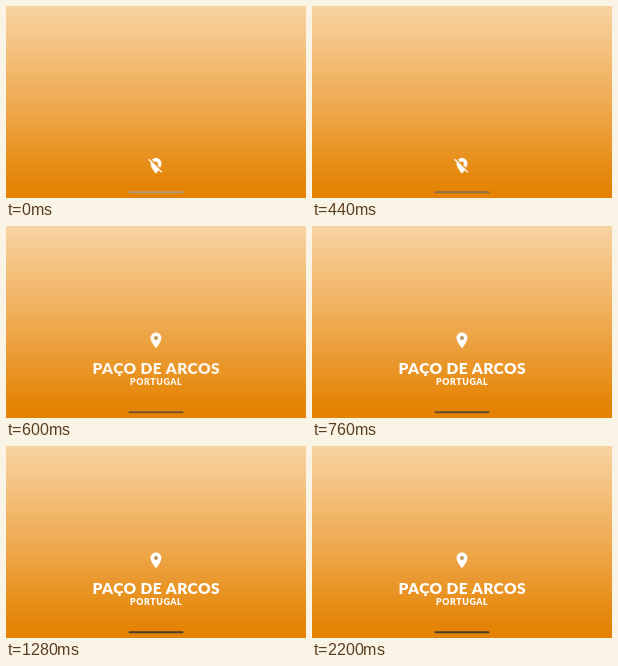
Write an HTML page that moves like this. It is 300 px wide and 192 px high and loops after 3040 ms.

```html
<!DOCTYPE html>
<html lang="pt">
<head>
<meta charset="utf-8">
<title>Paço de Arcos</title>
<style>
  html, body { margin: 0; width: 100%; height: 100%; overflow: hidden; }
  svg { display: block; width: 100%; height: 100%; }
  text { font-family: Lato, sans-serif; font-weight: 900; fill: #fff; text-anchor: middle; }
  .town { font-size: 15.5px; letter-spacing: .45px; }
  .country { font-size: 8.8px; letter-spacing: .6px; }
  .off, .place, .bar { animation: 3040ms linear infinite; }
  .off { animation-name: rise; }
  .place { animation-name: reveal; }
  .bar { animation-name: darken; }

  /* the crossed-out pin waits, then accelerates upwards until the cut at 600 ms */
  @keyframes rise {
    0% { transform: translateY(0); opacity: 1; }
    14.474% { transform: translateY(0); animation-timing-function: cubic-bezier(.333, 0, .667, 0); }
    19.7% { transform: translateY(-41px); opacity: 1; }
    19.701%, 100% { transform: translateY(-41px); opacity: 0; }
  }
  @keyframes reveal {
    0%, 19.7% { opacity: 0; }
    19.701% { opacity: .92; }
    25%, 100% { opacity: 1; }
  }
  @keyframes darken {
    0% { fill: #b39a7c; }
    14.474% { fill: #8f7048; }
    19.737% { fill: #765529; }
    30.263% { fill: #57422a; }
    42.105%, 100% { fill: #493f35; }
  }
</style>
</head>
<body>
<svg viewBox="0 0 300 192" preserveAspectRatio="none">
  <defs>
    <linearGradient id="sky" x2="0" y2="1">
      <stop stop-color="#f8d3a2"/>
      <stop offset=".5" stop-color="#efab52"/>
      <stop offset=".92" stop-color="#e58507"/>
      <stop offset="1" stop-color="#e48200"/>
    </linearGradient>
  </defs>
  <rect width="300" height="192" fill="url(#sky)"/>

  <g class="off">
    <path transform="translate(140.6 150.4) scale(.78)" fill="#fff" d="M12 6.5c1.38 0 2.5 1.12 2.5 2.5 0 .74-.33 1.39-.83 1.85l3.63 3.63c.98-1.86 1.7-3.8 1.7-5.48 0-3.87-3.13-7-7-7-1.98 0-3.76.83-5.04 2.15l3.19 3.19c.46-.52 1.11-.84 1.85-.84zm4.37 9.6l-4.74-4.74L3.27 3 2 4.27l3.18 3.18C5.07 7.95 5 8.47 5 9c0 5.25 7 13 7 13s1.67-1.85 3.38-4.35L18.73 21 20 19.73z"/>
  </g>

  <g class="place">
    <g transform="translate(140.6 105) scale(.78)">
      <path fill="#fff" d="M12 2C8.13 2 5 5.13 5 9c0 5.25 7 13 7 13s7-7.75 7-13c0-3.87-3.13-7-7-7z"/>
      <circle cx="12" cy="9" r="2.5" fill="#b99458"/>
    </g>
    <text class="town" x="150.3" y="148.3">PAÇO DE ARCOS</text>
    <text class="country" x="150.2" y="158.8">PORTUGAL</text>
  </g>

  <rect class="bar" x="122.5" y="185.3" width="55" height="2" rx="1"/>
</svg>
</body>
</html>
```
